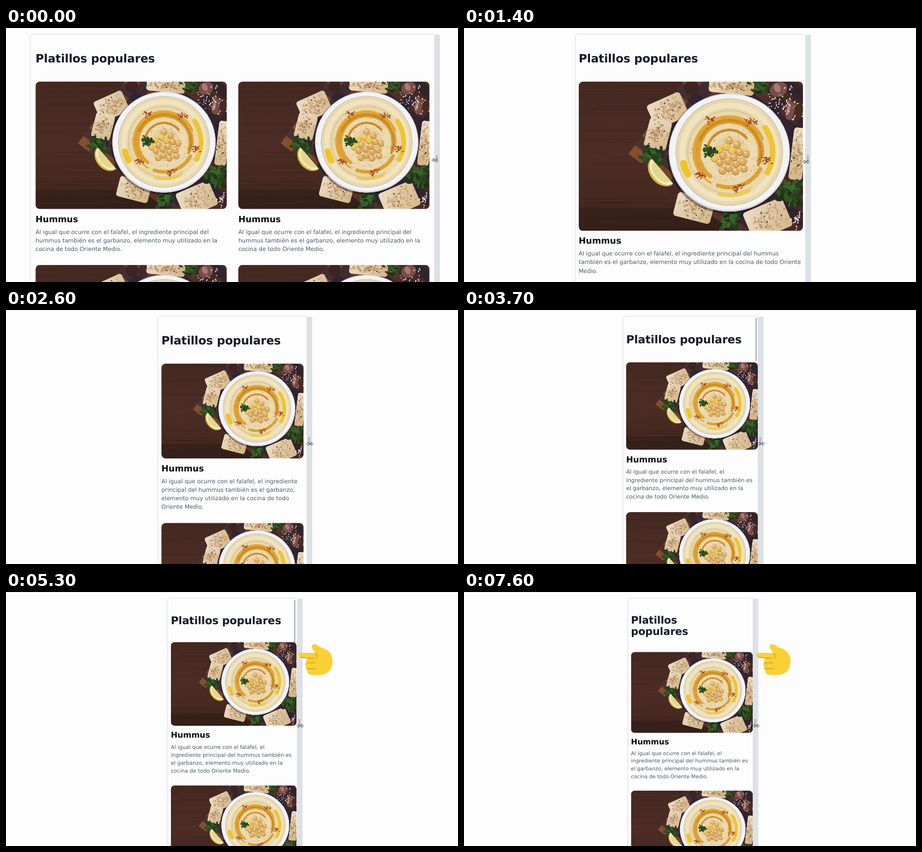
An HTML page with a canvas for the animation above (7.7 s loop, 800x450 px).

```html
<!DOCTYPE html>
<html lang="es">
<head>
<meta charset="utf-8">
<title>Platillos populares</title>
<style>
  html, body { margin: 0; width: 100%; height: 100%; overflow: hidden; background: #fefdfe; }
  #stage { position: relative; width: 800px; height: 450px; overflow: hidden; border-top: 1px solid #f0eff0; box-sizing: border-box; }
  #stage > * { position: absolute; }
  #panel { top: 11px; height: 460px; overflow: hidden; background: #fefdfe; }
  #shade { top: 11px; height: 460px; box-shadow: 0 0 4px rgba(30, 35, 45, .22); }
  #page { padding: 49px 8px 0; box-sizing: border-box; transform-origin: 0 0;
    font-family: "DejaVu Sans", Verdana, sans-serif; text-rendering: geometricPrecision; }
  #page main { max-width: 1100px; margin: 0 auto; }
  h1 { margin: 0 0 47px; font-size: 32px; line-height: 35px; letter-spacing: -.15px; color: #111827; }
  #grid { display: grid; grid-template-columns: repeat(auto-fit, minmax(380px, 1fr)); gap: 32px; }
  #grid canvas { display: block; width: 100%; aspect-ratio: 3 / 2; border-radius: 12px; }
  h3 { margin: 12px 0 8px; font-size: 24px; line-height: 32px; color: #080808; }
  p { margin: 0; padding-right: 2px; font-size: 16px; line-height: 24px; color: #4b5563; }
  #thumb { top: 13px; width: 2px; height: 76px; background: #a3a9ad; }
  #strip { top: 11px; width: 10px; height: 440px; background: #dce1e4; }
  #strip::after { content: ""; position: absolute; left: 3px; top: 213px; width: 1px; height: 13px;
    border: solid #9ba3a8; border-width: 0 1px; }
  svg { left: 0; top: -1px; }
</style>
</head>
<body>
<div id="stage">
  <div id="shade"></div>
  <div id="panel">
    <div id="page"><main><h1>Platillos populares</h1><div id="grid"></div></main></div>
  </div>
  <div id="thumb"></div>
  <div id="strip"></div>
  <svg width="800" height="450" viewBox="0 0 800 450">
    <g id="hand">
      <path fill="#f9d035" d="M521 107.500 L548 108 Q542 102 541 97 Q541 92 547 92.500 Q552 94 556 98 Q578 103 578 123 Q577 147 553 147 H541 Q533 146 533.500 139.500 Q529.500 137 531.500 132 Q528 129 531 124.500 Q531 120 534 117.500 L521 115.500 Q517.500 114.500 517.500 111.500 Q517.500 107.500 521 107.500Z"/>
      <path fill="none" stroke="#d99e20" stroke-width="1.4" stroke-linecap="round" d="M521 115.500 Q534 118 545 117 M532 125.500 H546 M533 136 H547 M548 108 Q552 112 550 117"/>
    </g>
    <path id="cursor" d="M-5.500 0 L-2.500 -3 V-.8 H2.500 V-3 L5.500 0 L2.500 3 V.8 H-2.500 V3Z" fill="#fff" stroke="#3d4247" stroke-width=".9"/>
  </svg>
</div>
<script>
const LOOP = 7700, STEP = 100, ZOOM = 0.634, MIN_PAGE = 388, MIRROR = 801.9;
const $ = id => document.getElementById(id);
const clamp = v => Math.max(0, Math.min(1, v));

// Time and left edge of the drag strip
const drag = [[0, 758], [900, 654.5], [1400, 604.4], [1600, 580], [2600, 532], [3700, 520], [6400, 511], [LOOP, 511]];

function track(keys, t) {
  const i = Math.max(1, keys.findIndex(k => k[0] >= t));
  const [t0, a] = keys[i - 1], [t1, b] = keys[i];
  return a + (b - a) * (t - t0) / (t1 - t0);
}

let seed = 11;
const rnd = () => (seed = (seed * 16807) % 2147483647) / 2147483647;
const spread = r => (rnd() + rnd() - 1) * r;

function drawDish(c) {
  const oval = (fill, x, y, rx, ry = rx, turn = 0, end = 7) => {
    c.beginPath();
    c.ellipse(x, y, rx, ry, turn, 0, end);
    c.fillStyle = fill;
    c.fill();
  };
  const ring = (col, width, r, from = 0, to = 7) => {
    c.beginPath();
    c.arc(333, 156, r, from, to);
    c.strokeStyle = col;
    c.lineWidth = width;
    c.stroke();
  };
  const specks = (n, x, y, rx, ry, col, size) => {
    for (let i = 0; i < n; i++) oval(col, x + spread(rx), y + spread(ry), size * (.4 + rnd()), size * .5, rnd() * 3);
  };
  const at = (x, y, turn, draw) => {
    c.save();
    c.translate(x, y);
    c.rotate(turn);
    draw();
    c.restore();
  };
  const bread = (x, y, w, h, turn) => at(x, y, turn, () => {
    const tone = c.createLinearGradient(-w, -h, w, h);
    tone.addColorStop(0, "#ecdfc6");
    tone.addColorStop(1, "#d3b68a");
    c.beginPath();
    c.roundRect(-w, -h, 2 * w, 2 * h, 7);
    c.fillStyle = tone;
    c.fill();
    c.clip();
    specks(60, 0, 0, w, h, "rgba(165,105,55,.3)", 4);
    specks(9, 0, 0, w, h, "#2b1d18", 2);
  });
  const leaves = (x, y, r) => {
    for (let i = 0; i < 45; i++)
      oval(`hsl(${95 + rnd() * 15},42%,${13 + rnd() * 16}%)`, x + spread(r), y + spread(r * .9), r * .24, r * .12, rnd() * 3);
  };
  const garlic = (x, y, rx, ry, turn) => {
    oval("#7b4c48", x, y, rx, ry, turn);
    oval("#a77a74", x - 3, y - 3, rx * .35, ry * .65, turn);
  };

  // Wooden table
  const wood = c.createLinearGradient(0, 0, 0, 331);
  wood.addColorStop(0, "#452921");
  wood.addColorStop(.5, "#4c2d26");
  wood.addColorStop(.84, "#44281f");
  wood.addColorStop(.85, "#38221b");
  wood.addColorStop(1, "#34201a");
  c.fillStyle = wood;
  c.fillRect(0, 0, 496, 331);
  for (let i = 0; i < 70; i++) {
    c.fillStyle = i % 2 ? "rgba(25,12,10,.13)" : "rgba(125,75,60,.09)";
    c.fillRect(rnd() * 250 - 60, rnd() * 331, 80 + rnd() * 220, 1 + rnd());
  }

  // Plaid cloth
  at(110, 160, .64, () => {
    const cloth = c.createLinearGradient(0, 0, 320, -160);
    cloth.addColorStop(0, "#88502f");
    cloth.addColorStop(.6, "#59322a");
    cloth.addColorStop(1, "#4a2926");
    c.fillStyle = cloth;
    c.fillRect(0, -300, 420, 300);
    c.fillStyle = "rgba(35,32,52,.6)";
    for (let i = 0; i < 5; i++) {
      c.fillRect(36 + i * 74, -300, 30, 300);
      c.fillRect(0, -50 - i * 74, 420, 26);
    }
  });

  bread(197, 64, 40, 29, -.42);
  bread(175, 116, 25, 33, .25);
  bread(338, 11, 50, 16, .1);
  bread(485, 160, 15, 58, .12);
  bread(255, 280, 42, 27, .25);
  bread(418, 305, 47, 34, -.4);

  // Garnish around the bowl
  oval("#3d2420", 250, 13, 16);
  garlic(442, 17, 20, 16, -.4);
  garlic(467, 64, 10, 21, .15);
  specks(62, 462, 50, 48, 52, "#e9dfd2", 2.3);
  specks(24, 480, 308, 17, 22, "#e9dfd2", 2.3);
  leaves(400, 9, 24);
  leaves(160, 164, 28);
  leaves(468, 246, 36);
  leaves(334, 307, 30);
  at(182, 201, .86, () => {
    oval("#dcb63c", 0, -4, 37, 28, 0, Math.PI);
    oval("#f2ebc0", 0, -4, 35, 23, 0, Math.PI);
    oval("#e3d68f", 0, -3, 28, 17, 0, Math.PI);
  });

  // Bowl
  oval("rgba(20,8,6,.4)", 331, 160, 136, 133);
  oval("#d9dce1", 333, 157, 134, 131);
  oval("#f2f3f5", 333, 156, 132, 128);
  oval("#cfc7b4", 333, 156, 119);
  oval("#e9d8ab", 333, 156, 117);
  ring("#f0e3c1", 12, 104);
  ring("#ddc692", 3, 92, 1, 5.4);

  // Oil swirls and paprika
  c.lineCap = "round";
  for (let i = 0; i < 14; i++) ring(`hsl(${33 + rnd() * 9},72%,${46 + rnd() * 12}%)`, 4 + rnd() * 5, 66 + rnd() * 16, 2 + rnd() * 2, 5 + rnd() * 2.5);
  ring("#edc431", 12, 96, -.6, .5);
  ring("#efc428", 15, 104, 2.65, 2.9);
  ring("#e9cb55", 8, 96, 1.1, 1.8);
  ring("#d9a136", 9, 78, .5, 1.9);
  oval("#ebdab2", 335, 158, 56, 58);
  ring("#d08a2a", 6, 49, 3.2, 5.6);
  oval("#e7d0a0", 336, 164, 40, 44);
  specks(260, 333, 158, 92, 94, "rgba(186,100,32,.6)", 1.4);
  for (let i = 0; i < 5; i++) {
    const a = 1.15 * i - 2.1;
    specks(22, 333 + 82 * Math.cos(a), 156 + 82 * Math.sin(a), 17, 11, "#a5481a", 2.6);
  }

  // Chickpeas
  for (let i = 17; i >= 0; i--) {
    const r = 9 * Math.sqrt(i + .4), a = i * 2.4;
    const x = 338 + r * Math.cos(a), y = 167 + r * Math.sin(a) * 1.06;
    oval("#a8722f", x, y + 1, 8.3);
    oval(i % 5 == 2 ? "#e9c54d" : "#dbac5e", x, y, 7.8);
    oval("#ecce90", x - 2, y - 2.4, 3.8, 3.2);
  }
  leaves(290, 155, 18);
}

const dish = document.createElement("canvas");
dish.width = 744;
dish.height = 496;
const dishCtx = dish.getContext("2d");
dishCtx.scale(1.5, 1.5);
drawDish(dishCtx);

for (let i = 0; i < 4; i++) {
  const card = document.createElement("article");
  card.innerHTML = `<canvas width="744" height="496"></canvas><h3>Hummus</h3>
    <p>Al igual que ocurre con el falafel, el ingrediente principal del hummus también es el garbanzo, elemento muy utilizado en la cocina de todo Oriente Medio.</p>`;
  card.firstChild.getContext("2d").drawImage(dish, 0, 0);
  $("grid").append(card);
}

function render(t) {
  const x = track(drag, t), left = MIRROR - x, width = x - left;
  const fit = Math.min(1, width / (MIN_PAGE * ZOOM));
  for (const id of ["panel", "shade"]) {
    $(id).style.left = left + "px";
    $(id).style.width = width + "px";
  }
  $("page").style.width = width / ZOOM + "px";
  $("page").style.transform = `scale(${ZOOM * fit})`;
  $("strip").style.left = x + "px";
  $("thumb").style.left = x - 4.5 + "px";
  $("thumb").style.opacity = fit < 1 ? clamp((7000 - t) / 400) : 0;
  $("hand").style.display = t >= 3900 ? "" : "none";
  const cx = x + 1.3 + 4.7 * clamp((t - 1400) / 1200);
  const cy = 234 + 3 * clamp(t / 900);
  $("cursor").setAttribute("transform", `translate(${cx} ${cy})`);
}

const start = performance.now();
function frame() {
  const t = (performance.now() - start) % LOOP;
  render(Math.floor(t / STEP) * STEP);
  requestAnimationFrame(frame);
}
render(0);
requestAnimationFrame(frame);
</script>
</body>
</html>
```
